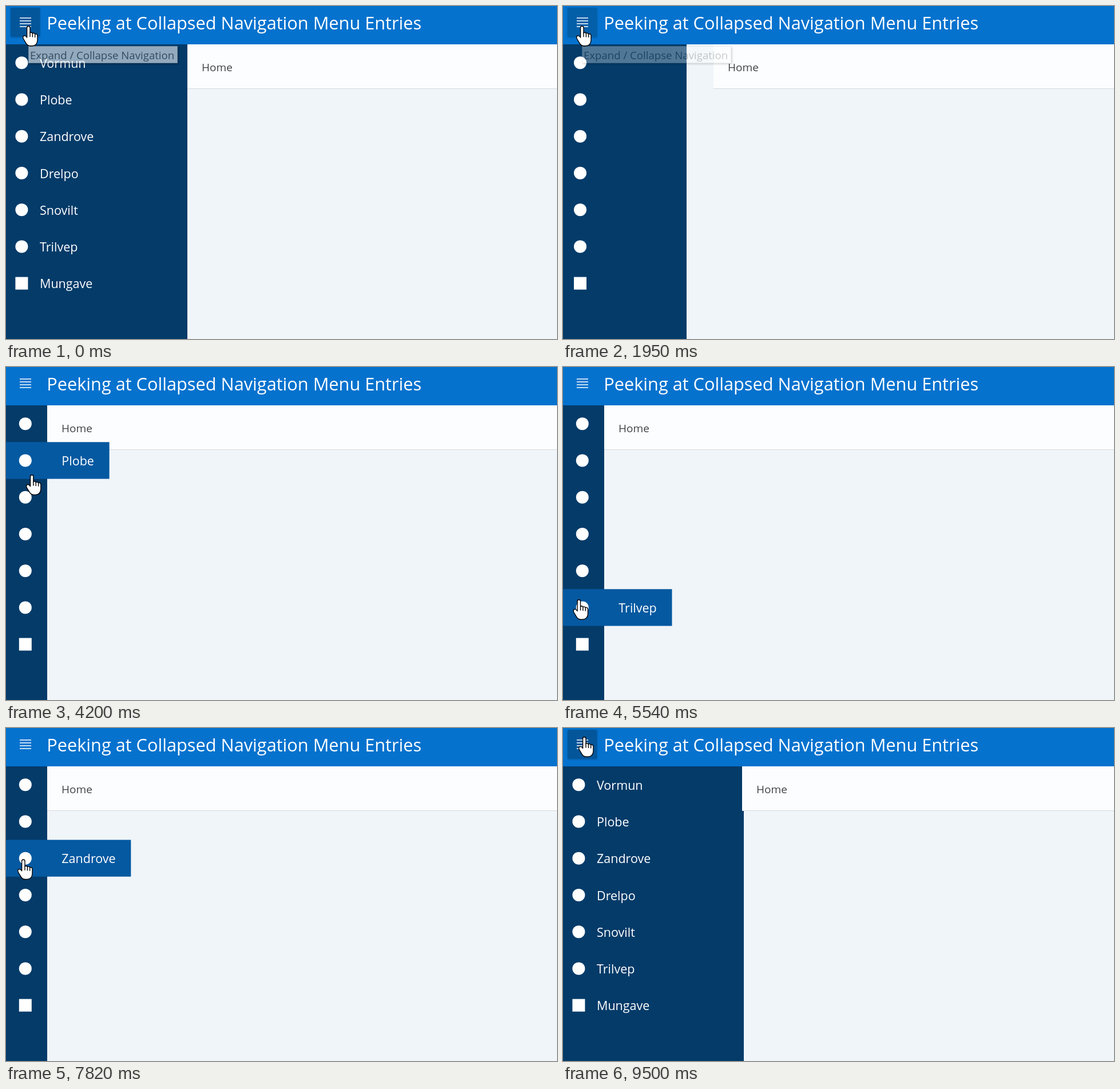
An HTML page that plays this animation: 963x582 px, repeating every 9.58 s.

```html
<!DOCTYPE html>
<html lang="en">
<head>
<meta charset="utf-8">
<title>Collapsed navigation</title>
<style>
  html, body { margin: 0; width: 100%; height: 100%; overflow: hidden; background: #f0f5f9; }
  svg { display: block; }
  text { font-family: "Open Sans", "Noto Sans", sans-serif; white-space: pre; }
  .label { font-size: 21.5px; fill: #fff; }
  #icons { fill: #fff; }
  #button { filter: drop-shadow(0 1px 1.5px rgba(0, 0, 0, .2)); }
  #tip rect { fill: #fff; stroke: #cacaca; filter: drop-shadow(2px 2px 1.5px rgba(0, 0, 0, .45)); }
</style>
</head>
<body>
<svg width="963" height="582" viewBox="0 0 963 582">
  <rect width="963" height="582" fill="#f0f5f9"/>
  <rect id="nav" y="66" height="516" fill="#043b69"/>
  <g id="bar">
    <rect y="66" width="900" height="78" fill="#fcfdfe"/>
    <rect y="144" width="900" height="1" fill="#d4dade"/>
    <text x="25" y="113.5" font-size="19" fill="#404447">Home</text>
  </g>
  <g id="peek">
    <rect height="64.25" fill="#0459a1"/>
    <text class="label" x="97.3"></text>
  </g>
  <svg id="labels" height="582"></svg>
  <g id="icons"></g>
  <rect width="963" height="67" fill="#0572ce"/>
  <rect id="button" x="8" y="3" width="51.5" height="51" rx="2.5"/>
  <path d="M24 21h20M24 26h20M24 31h20M24 36h20" stroke="#fff" stroke-width="1.5"/>
  <text x="71.3" y="41" font-size="30.7" fill="#fff">Peeking at Collapsed Navigation Menu Entries</text>
  <g id="tip">
    <rect x=".5" y="70.5" width="260" height="29"/>
    <text x="3" y="92.5" font-size="18.6" fill="#575757">Expand / Collapse Navigation</text>
  </g>
  <g id="cursor" stroke="#000" stroke-width="1.4" stroke-linejoin="round" stroke-linecap="round">
    <path fill="#fff" d="M7.6 3.4a2.7 2.7 0 0 1 5.4 0V12.500q2.200-2 4.400.9q2.600-1.500 4.300 1.100q3.400-1 4.300 2.400V25.500q-.6 9.500-9.500 9.800h-2.600q-5.200-.2-8-5L1.200 22.500Q-.2 18.300 2.600 17.500q2-.5 3.700 1.400l1.300 1.600Z"/>
    <path fill="none" d="M13 12.500v6.500M17.400 13.500v6M21.700 15v5"/>
  </g>
</svg>
<script>
const LOOP = 9580, TOP = 67, ROW = 64.25, WIDE = 317, NARROW = 72, PADDING = 26;
const names = ["Vormun", "Plobe", "Zandrove", "Drelpo", "Snovilt", "Trilvep", "Mungave"];
const $ = id => document.getElementById(id);

// pointer moves; a power above 1 speeds up, below 1 slows down
const moves = [
  { from: 70, to: 220, x: 38, y: 34.5 },
  { from: 1000, to: 1001, x: 33, y: 34.5 },
  { from: 2840, to: 3120, x: 46, y: 94 },
  { from: 3560, to: 3740, x: 46, y: 161 },
  { from: 4150, to: 4520, x: 43, y: 234, power: .5 },
  { from: 4640, to: 5630, x: 26, y: 423 },
  { from: 5690, to: 6010, x: 29, y: 488 },
  { from: 6380, to: 7360, x: 30, y: 369, power: 2 },
  { from: 7400, to: 8360, x: 30, y: 158, power: .5 },
  { from: 8410, to: 8730, x: 37, y: 15 }
];

const lerp = (a, b, k) => a + (b - a) * k;
const ramp = (t, from, length) => Math.min(1, Math.max(0, (t - from) / length));
const smooth = (t, from, length) => { const k = ramp(t, from, length); return k * k * (3 - 2 * k); };
const show = (el, on) => el.setAttribute("visibility", on ? "visible" : "hidden");
const move = (el, x, y = 0) => el.setAttribute("transform", `translate(${x} ${y})`);
const rowMiddle = row => TOP + ROW * (row + .5);
const baseline = row => rowMiddle(row) + 8.7;

function add(parent, tag, attrs, text = "") {
  const el = document.createElementNS("http://www.w3.org/2000/svg", tag);
  for (const key in attrs) el.setAttribute(key, attrs[key]);
  el.textContent = text;
  parent.append(el);
}

names.forEach((name, row) => {
  const size = 22, isLast = row === names.length - 1;
  add($("labels"), "text", { class: "label", x: 59, y: baseline(row) }, name);
  add($("icons"), "rect", {
    x: -size / 2, y: rowMiddle(row) - size / 2,
    width: size, height: size, rx: isLast ? 0 : size / 2
  });
});

function pointer(t) {
  let x = 39, y = 34.5;
  for (const m of moves) {
    const k = ramp(t, m.from, m.to - m.from) ** (m.power || 1);
    x = lerp(x, m.x, k);
    y = lerp(y, m.y, k);
  }
  return [x, y];
}

function tipOpacity(t) {
  if (t < 1000) return .57 * (1 - ramp(t, 0, 190));
  return t < 1460 ? 0 : 1 - ramp(t, 1750, 290);
}

// left edge for a part that starts to move a little late
const edge = (t, closeLag, openLag) => Math.round(lerp(WIDE, NARROW,
  smooth(t, 1790 + closeLag, 365) - smooth(t, 9049 + openLag, 470)));

function drawPeek(row) {
  const [box, label] = $("peek").children;
  show($("peek"), row >= 0);
  if (row < 0) return;
  label.textContent = names[row];
  label.setAttribute("y", baseline(row));
  box.setAttribute("y", TOP + ROW * row);
  box.setAttribute("width", NARROW + 2 * PADDING + label.getComputedTextLength());
}

function draw(t) {
  const [x, y] = pointer(t);
  const navWidth = edge(t, 0, 0);

  $("nav").setAttribute("width", navWidth);
  $("labels").setAttribute("width", navWidth);
  show($("labels"), t < 1780 || t >= 9100);
  move($("bar"), edge(t, 50, 16));
  move($("icons"), lerp(33.8, 27.4, (navWidth - NARROW) / (WIDE - NARROW)));
  drawPeek(Math.floor((y - TOP) / ROW));

  show($("button"), y < 54);
  $("button").setAttribute("fill", t >= 1780 && t < 9040 ? "#045fa9" : "#04569b");
  move($("tip"), t < 1000 ? 39 : 33);
  $("tip").setAttribute("opacity", tipOpacity(t));
  move($("cursor"), x - 10, y);
}

const start = performance.now();
function frame() {
  draw((performance.now() - start) % LOOP);
  requestAnimationFrame(frame);
}
frame();
</script>
</body>
</html>
```
